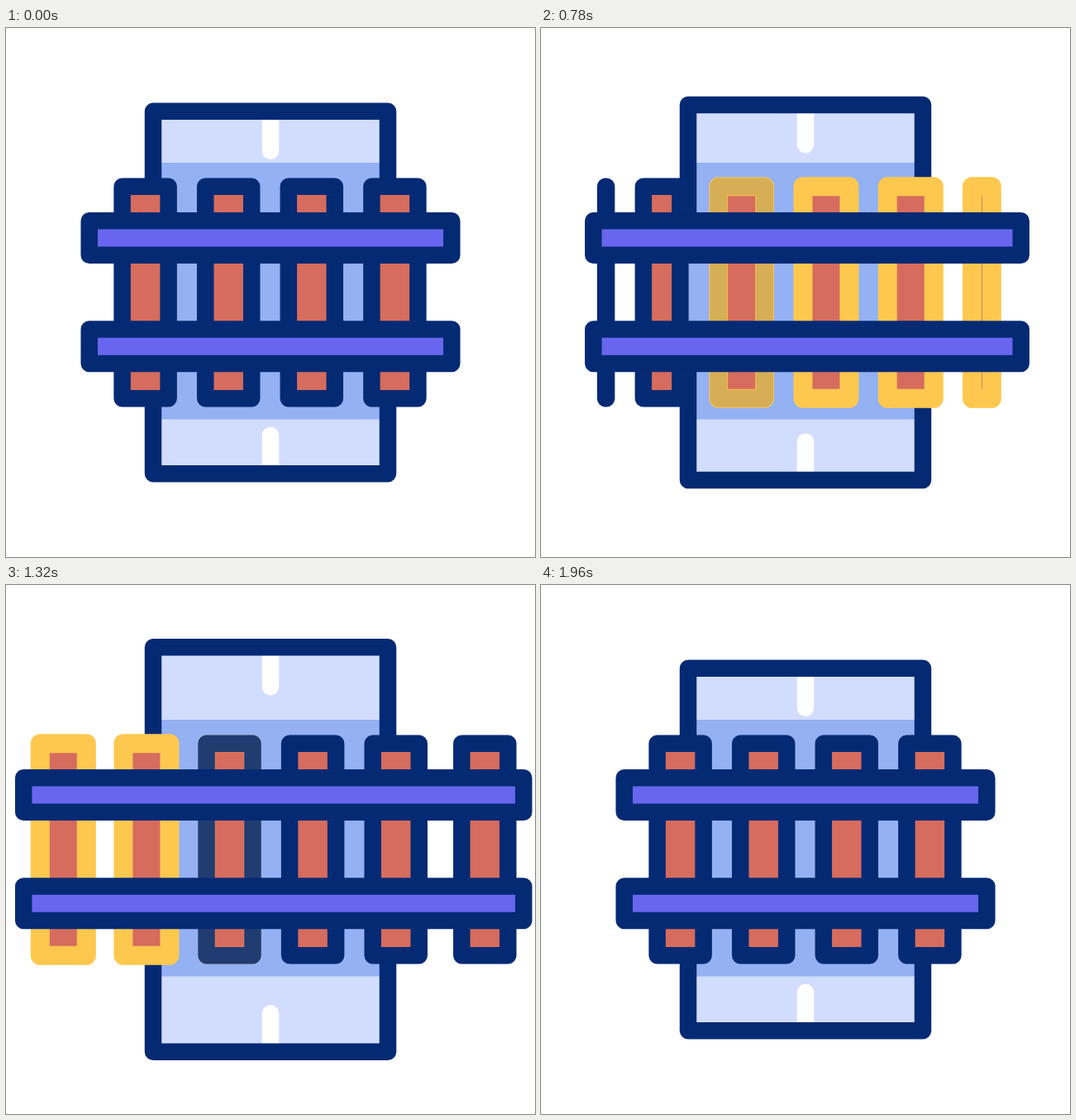
An HTML page with a canvas that plays this animation: 640 px wide and 640 px high, repeating every 2260 ms.

```html
<!DOCTYPE html>
<html lang="en">
<head>
<meta charset="utf-8">
<title>Railway crossing</title>
<style>
  html, body { margin: 0; width: 100%; height: 100%; overflow: hidden; background: #fff; }
  canvas { display: block; width: 640px; height: 640px; }
</style>
</head>
<body>
<canvas id="stage" width="640" height="640"></canvas>
<script>
const ctx = document.getElementById('stage').getContext('2d');
const LOOP = 2260;
const NAVY = '#042a74', GOLD = '#fec84f', RED = '#d66c5d', VIOLET = '#6866ee';
const PALE = '#d2ddfd', BLUE = '#93b1f3';
const LINE = 20.5;

// Turning points of the movement, in ms.
const START = 220, DIP = 400, PEAK = 1320, SAG = 1680, END = 1960;

const clamp = v => Math.min(1, Math.max(0, v));
const ramp = (v, from, to) => clamp((v - from) / (to - from));
const smooth = u => u * u * (3 - 2 * u);
const ease = (t, from, to) => smooth(ramp(t, from, to));
const pulse = (t, a, b, c, d) => ease(t, a, b) - ease(t, c, d);

// Draw in, spring wide open, fall back a little too far, settle.
function swing(t, rest, dip, peak, sag) {
  const u = ramp(t, DIP, PEAK);
  const open = smooth(u * (1.45 - .45 * u));
  return rest
    + (dip - rest) * ease(t, START, DIP)
    + (peak - dip) * open
    + (sag - peak) * ease(t, PEAK, SAG)
    + (rest - sag) * ease(t, SAG, END);
}

// Distance the sleepers have moved left, in pitches; one per loop.
function travel(t) {
  return .147 * ease(t, START, 560) + .84 * ease(t, 640, 1280)
    + .175 * ease(t, PEAK, 1700) - .162 * ease(t, 1700, END);
}

// Gold runs from the right-hand sleeper to the left, then leaves the same way.
function glow(t, i) {
  const on = Math.max(START, 780 - 255 * (i - 1));
  const off = Math.max(1070, 1144 + 180 * (3 - i));
  return ramp(t, on, on + 305) - ramp(t, off, off + 200);
}

function outline(x0, y0, x1, y1, color, width = LINE) {
  ctx.strokeStyle = color;
  ctx.lineWidth = width;
  ctx.strokeRect(x0, y0, x1 - x0, y1 - y0);
}

function fill(x0, y0, x1, y1, color) {
  ctx.fillStyle = color;
  ctx.fillRect(x0, y0, x1 - x0, y1 - y0);
}

function dash(y0, y1) {
  ctx.beginPath();
  ctx.moveTo(320, y0);
  ctx.lineTo(320, y1);
  ctx.strokeStyle = '#fff';
  ctx.lineWidth = LINE;
  ctx.stroke();
}

function drawRoad(t) {
  const half = swing(t, 219.3, 206.3, 244.8, 207.3);
  const top = 320 - half, bottom = 320 + half;
  fill(178, top, 462, bottom, PALE);
  fill(178, 163, 462, 473.5, BLUE);
  dash(top + 11, top + 48);
  dash(bottom - 11, bottom - 46.5);

  // The border is open between the two rails.
  ctx.save();
  ctx.beginPath();
  ctx.rect(0, 0, 640, 254);
  ctx.rect(0, 385, 640, 255);
  ctx.clip();
  outline(178, top, 462, bottom, NAVY);
  ctx.restore();
}

function drawSleeper(x0, x1, gold) {
  const top = 191.7, bottom = 448.3;
  fill(x0, top, x1, bottom, RED);
  outline(x0, top, x1, bottom, NAVY);
  ctx.globalAlpha = gold;
  outline(x0, top, x1, bottom, GOLD, 23);
  ctx.globalAlpha = 1;
}

function drawSleepers(t, railStart, railEnd) {
  const minX = railStart + 25, maxX = railEnd - 28;
  const pitch = 100.6 + 1.7 * pulse(t, 560, 780, 780, 1060);
  const pushL = 11.5 * pulse(t, START, 560, 780, 1000);
  const pushR = 7 * pulse(t, 780, 1060, PEAK, 1650);
  const squeeze = x => x + pushL * ramp(x, 160, 130);

  for (let i = 0; i < 7; i++) {
    let mid = 319.5 + (i - 2.5 - travel(t)) * pitch;
    mid += pushR * ramp(mid, 472, 492);
    // The two new sleepers on the right grow in one after the other.
    const born = 673 + 400 * (i - 5);
    const grown = i > 4 ? ease(t, born, born + 240) : 1;
    const x0 = Math.max(squeeze(mid - 28), minX);
    const x1 = Math.min(squeeze(mid - 28 + 56 * grown), maxX);
    if (!grown || x1 < x0 - 2) continue;
    drawSleeper(x0, Math.max(x1, x0 + 1), glow(t, i));
  }
}

function draw(t) {
  fill(0, 0, 640, 640, '#fff');
  const x0 = swing(t, 90.5, 101.5, 11, 80.5);
  const x1 = swing(t, 549.5, 538.4, 636.5, 534);
  drawRoad(t);
  drawSleepers(t, x0, x1);
  for (const y of [233.2, 364.6]) {
    fill(x0 + 10, y, x1 - 10, y + 41.5, VIOLET);
    outline(x0 + 10.2, y, x1 - 10.2, y + 41.5, NAVY);
  }
}

ctx.lineJoin = ctx.lineCap = 'round';
const start = performance.now();
function tick() {
  draw((performance.now() - start) % LOOP);
  requestAnimationFrame(tick);
}
tick();
</script>
</body>
</html>
```
